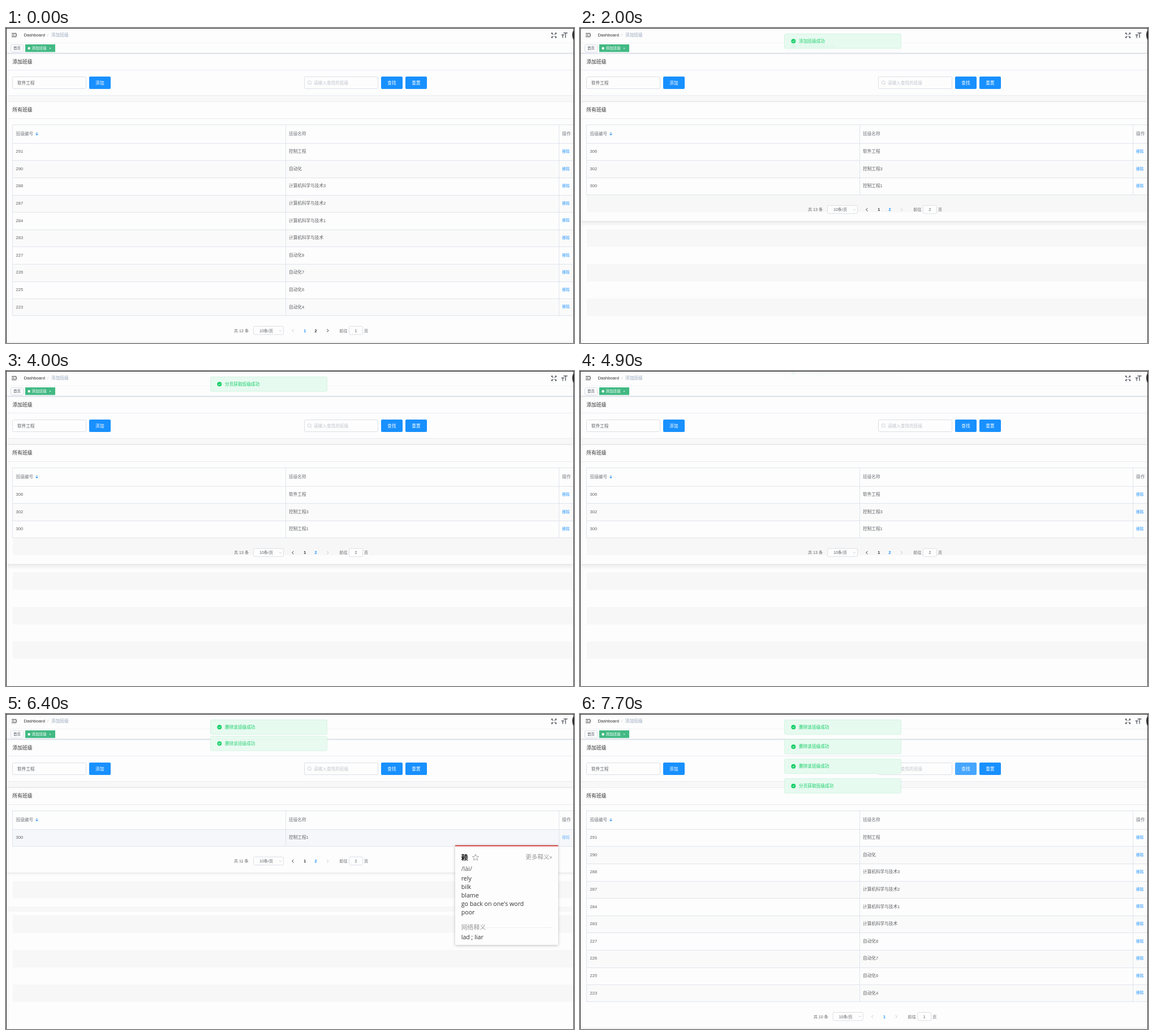
Recreate the animation shown at these times as an HTML page. Size 1004 by 558 pixels, loop 8 s.

```html
<!DOCTYPE html>
<html>
<head>
<meta charset="utf-8">
<title>班级管理</title>
<style>
  html, body { margin: 0; width: 100%; height: 100%; overflow: hidden; background: #fdfdfd; }
  svg { display: block; width: 1004px; height: 558px; }
  text { font-family: "Liberation Sans", "Noto Sans CJK SC", sans-serif; white-space: pre; }
  .dict text { font-family: "Open Sans", "Noto Sans CJK SC", sans-serif; }
</style>
</head>
<body>
<svg id="stage" viewBox="0 0 1004 558"></svg>
<script>
const LOOP = 8000, STEP = 100;
const BLUE = '#1890ff', LIGHT_BLUE = '#46a6ff', GREEN = '#13ce66';
const DARK = '#303133', BODY = '#606266', MUTED = '#c0c4cc', BORDER = '#dfe4ec';
const WHITE = '#fdfdfd', GAP = '#f8f8f9';
const ROW_TOP = 204, ROW_H = 30.6, SLOT_H = 34.7;

const FIRST_PAGE = [
  [291, '控制工程'], [290, '自动化'], [288, '计算机科学与技术3'], [287, '计算机科学与技术2'],
  [284, '计算机科学与技术1'], [283, '计算机科学与技术'], [227, '自动化8'], [226, '自动化7'],
  [225, '自动化6'], [223, '自动化4']
];
const SECOND_PAGE = [[306, '软件工程'], [302, '控制工程3'], [300, '控制工程1']];

const ADDED = '添加班级成功', PAGED = '分页获取班级成功', REMOVED = '删除该班级成功';
const FIRST_CLOSE = 3590;
const MESSAGES = [
  { text: ADDED, start: 880, end: FIRST_CLOSE, slot: () => 0 },
  { text: PAGED, start: 1980, end: 4700, slot: t => 1 - ease((t - FIRST_CLOSE) / 400) },
  { text: REMOVED, start: 5645, end: LOOP, slot: () => 0 },
  { text: REMOVED, start: 6210, end: LOOP, slot: () => 1 },
  { text: REMOVED, start: 6770, end: LOOP, slot: () => 2 },
  { text: PAGED, start: 6790, end: LOOP, slot: () => 3 }
];

// The CSS "ease" curve
function ease(x) {
  if (x <= 0) return 0;
  if (x >= 1) return 1;
  const curve = (u, a, b) => 3 * (1 - u) ** 2 * u * a + 3 * (1 - u) * u * u * b + u ** 3;
  let lo = 0, hi = 1;
  for (let i = 0; i < 20; i++) {
    const mid = (lo + hi) / 2;
    if (curve(mid, .25, .25) < x) lo = mid; else hi = mid;
  }
  return curve(lo, .1, 1);
}

const between = (t, from, to) => t >= from && t < to;

// y is the vertical middle of the text
function text(x, y, str, fill = BODY, size = 7.65, extra = '') {
  return `<text x="${x}" y="${y + size * .36}" fill="${fill}" font-size="${size}" ${extra}>${str}</text>`;
}
const centred = (x, y, str, fill, size, extra = '') =>
  text(x, y, str, fill, size, `text-anchor="middle" ${extra}`);
const rect = (x, y, w, h, fill, extra = '') =>
  `<rect x="${x}" y="${y}" width="${w}" height="${h}" fill="${fill}" ${extra}/>`;
const box = (x, y, w, h, stroke = '#dcdfe6', fill = WHITE) =>
  rect(x + .5, y + .5, w - 1, h - 1, fill, `stroke="${stroke}" rx="2"`);
const path = (d, stroke, width = 1, fill = 'none') =>
  `<path d="${d}" stroke="${stroke}" stroke-width="${width}" fill="${fill}"/>`;
const hline = (y, x = 1, fill = '#e8ecf3') => rect(x, y, 1003 - x, 1, fill);

function button(x, label, fill = BLUE) {
  return rect(x, 86, 38, 22, fill, 'rx="2"') +
    centred(x + 19, 97, label, '#fff', 7.65, 'font-weight="500"');
}

function header() {
  const corner = (sx, sy) =>
    `<g transform="translate(968.5 13) scale(${sx} ${sy})">` +
    path('M1.2 1.2L4 4', '#5a5e66', 1.3) + path('M4.7 1.6V4.7H1.6Z', 'none', 0, '#5a5e66') + '</g>';
  return path('M10 9.5H18.5M10 12.5H15M10 15.5H18.5', DARK, 1.1) +
    path('M18.8 10.8V14.2L16.2 12.5Z', 'none', 0, DARK) +
    text(31.5, 12.3, 'Dashboard', DARK) + text(73, 12.3, '/', MUTED) +
    text(80, 12.3, '添加班级', '#97a8be') +
    corner(1, 1) + corner(-1, 1) + corner(1, -1) + corner(-1, -1) +
    path('M985.5 8.7H992.5M989 8.7V17.5M981.8 12.3H986.6M984.2 12.3V17.5', '#5a5e66', 1.4) +
    path('M1003 4Q999 12 1003 21Z', 'none', 0, '#222') +
    hline(26, 1, '#f3f4f6') +
    box(8, 29, 23, 14, '#d8dce5') + text(13, 36, '首页', '#495060', 6.56) +
    rect(34, 29, 53, 13.5, '#42b983') + '<circle cx="40.7" cy="36" r="2.2" fill="#fff"/>' +
    text(45.5, 36, '添加班级', '#fff', 6.56, 'font-weight="500"') +
    path('M76.8 34.8L79.2 37.2M79.2 34.8L76.8 37.2', '#e6f7ef', .7) +
    rect(1, 44, 1002, 1.5, '#d3d8e2') + rect(1, 45.5, 1002, 1, '#eff1f5');
}

function toolbar(t) {
  const addFill = t === 600 ? '#2f9bff' : between(t, 700, 1100) ? LIGHT_BLUE : BLUE;
  return text(11.5, 60, '添加班级', DARK, 8.75) + hline(74) +
    box(11, 86, 131, 22) + text(20, 97, '软件工程') + button(147, '添加', addFill) +
    box(527, 86, 131, 22) +
    '<circle cx="536.3" cy="96.5" r="3" fill="none" stroke="#c0c4cc" stroke-width=".8"/>' +
    path('M538.4 98.6L540 100.2', MUTED, .8) +
    text(544, 97, '请输入查找的班级', MUTED) +
    button(663, '查找', t >= 7700 ? LIGHT_BLUE : BLUE) + button(706, '重置');
}

function tableView(t) {
  const rows = t < 2000 || t >= 6800 ? FIRST_PAGE
    : SECOND_PAGE.slice(t < 5700 ? 0 : t < 6200 ? 1 : 2);
  const hovered = between(t, 2100, 3600) ? 2 : between(t, 5600, 6800) ? 0 : -1;
  const bottom = ROW_TOP + rows.length * ROW_H;
  const cardEnd = bottom + 46;
  let out = rect(1, 119, 1002, 12, GAP) + hline(119) + hline(130);
  if (rows.length < 10) {
    out += rect(1, 341, 1002, 9, '#f7f7f7');
    out += rect(1, 131, 1002, cardEnd - 131, WHITE, 'filter="url(#cardShadow)"');
    for (let i = 3; i < 10; i += 2)
      out += rect(12, ROW_TOP + i * ROW_H, 991, ROW_H, '#f7f7f7');
  }
  out += hline(Math.round(cardEnd), 1, '#e6e8ec');
  out += text(11.5, 145.3, '所有班级', DARK, 8.75) + hline(160);
  out += hline(171, 11, BORDER) + text(17.5, 187, '班级编号', '#75787e') +
    text(500, 187, '班级名称', '#75787e') + text(983, 187, '操作', '#75787e') +
    path('M52 186.8H57L54.5 184.3Z', 'none', 0, '#a9c4e4') +
    path('M52 187.8H57L54.5 190.3Z', 'none', 0, BLUE);
  rows.forEach(([id, name], i) => {
    const top = ROW_TOP + i * ROW_H, mid = top + 14.4;
    const linkLit = i === 0 && between(t, 5200, 6800);
    out += rect(12, top, 991, ROW_H, i === hovered ? '#f5f7fa' : i % 2 ? '#fafafa' : WHITE) +
      hline(Math.round(top - .2), 11, BORDER) +
      text(17.5, mid, id) + text(500, mid, name) +
      text(983.3, mid + .2, '移除', linkLit ? '#65b3ff' : BLUE, 6.56);
  });
  out += hline(Math.round(bottom - .6), 11, BORDER);
  for (const x of [11, 494, 977]) out += rect(x, 171, 1, bottom - 171, BORDER);
  return out + pager(t, bottom + 26);
}

function pager(t, y) {
  const total = t < 900 ? 12 : t < 5700 ? 13 : t < 6200 ? 12 : t < 6800 ? 11 : 10;
  const page = between(t, 2000, 6800) ? 2 : 1;
  const single = total === 10;
  const left = single ? 9.7 : 0, right = single ? -9.7 : 0;
  const arrow = (x, dir, on) =>
    path(`M${x - dir * 1.3} ${y - 2.6}L${x + dir * 1.3} ${y}L${x - dir * 1.3} ${y + 2.6}`, on ? DARK : MUTED, 1);
  const number = (x, n, lit) =>
    centred(x, y, n, lit ? BLUE : DARK, 7.1, 'font-weight="700"');
  return text(403 + left, y, `共 ${total} 条`, BODY, 7.1) +
    box(437 + left, y - 8, 54, 15.5) + centred(460 + left, y, '10条/页', BODY, 7.1) +
    path(`M${483 + left} ${y - .8}l2 2l2 -2`, MUTED, .8) +
    arrow(507 + left, -1, page === 2) + number(528.3 + left, 1, page === 1) +
    (single ? '' : number(547.5, 2, page === 2 || between(t, 1700, 2000))) +
    arrow(568.7 + right, 1, page === 1 && !single) +
    text(589.3 + right, y, '前往', BODY, 7.1) + box(606 + right, y - 8, 25, 15.5) +
    centred(618.5 + right, y, page, BODY, 7.1) + text(633 + right, y, '页', BODY, 7.1);
}

function message(m, t) {
  const shown = (span) => ease((t - m.start) / span) - ease((t - m.end) / span);
  const alpha = shown(300);
  if (t < m.start || alpha <= 0) return '';
  const y = 10 + m.slot(t) * SLOT_H - 26 * (1 - shown(400));
  return `<g opacity="${alpha}" transform="translate(0 ${y})">` +
    box(361, 0, 207, 26.5, '#d2f4e1', '#e7faf0') +
    `<circle cx="377.3" cy="13.3" r="4" fill="${GREEN}"/>` +
    path('M375.4 13.4L376.8 14.8L379.3 12.1', '#fff', .9) +
    text(387, 13, m.text, GREEN) + '</g>';
}

function dictCard(x, y, w, h, word, wordSpan, body) {
  let star = '';
  for (let i = 0; i < 10; i++) {
    const r = i % 2 ? 2.7 : 6, a = i * Math.PI / 5;
    star += `${i ? 'L' : 'M'}${x + wordSpan + r * Math.sin(a)} ${y + 21.8 - r * Math.cos(a)}`;
  }
  return '<g class="dict">' + rect(x, y, w, h, WHITE, 'filter="url(#popShadow)"') +
    rect(x, y, w, 1.8, '#c9302c') +
    text(x + 10.5, y + 22.5, word, '#111', 12.1, 'font-weight="700"') +
    path(star + 'Z', '#999', .9) +
    text(x + w - 10.3, y + 21, '更多释义»', '#999', 10.5, 'text-anchor="end"') + body + '</g>';
}
const entry = (x, y, str, fill = '#333') => text(x, y, str, fill, 10.65);
const section = (x, y, str, end) =>
  text(x, y, str, '#999', 10.85) + rect(x + 45, y, end - x - 45, 1, '#eeeeee');

function popups(t) {
  if (between(t, 3300, 3600))
    return dictCard(537, 293, 228.5, 136.5, '控制工程', 72,
      entry(548, 333, '[自] control engineering') +
      section(548, 360, '网络释义', 755) +
      entry(548, 377, 'Control Engineering ; handling technology') +
      section(548, 399, '相关查询', 755) + entry(548, 413, '工程', '#3a78c3'));
  if (between(t, 6400, 6700)) {
    const senses = ['rely', 'bilk', 'blame', "go back on one's word", 'poor'];
    return dictCard(794, 232.5, 182, 176.5, '赖', 36,
      entry(804.7, 274.5, '/lài/', '#555') +
      senses.map((s, i) => entry(804.7, 291 + 15.1 * i, s)).join('') +
      section(804.7, 378, '网络释义', 966) + entry(804.7, 394.7, 'lad ; liar'));
  }
  return '';
}

const shadow = (id, dy, blur, alpha) =>
  `<filter id="${id}" x="-10%" y="-10%" width="120%" height="120%">` +
  `<feDropShadow dx="0" dy="${dy}" stdDeviation="${blur}" flood-opacity="${alpha}"/></filter>`;
const DEFS = `<defs>${shadow('cardShadow', 1, 2.5, .12)}${shadow('popShadow', 1, 2.5, .25)}</defs>`;
const EDGES = rect(0, 0, 1004, 1, '#222') + rect(0, 0, 1, 558, '#222') + rect(1003, 0, 1, 558, '#333');

function scene(t) {
  return DEFS + rect(0, 0, 1004, 558, WHITE) + tableView(t) + header() + toolbar(t) +
    MESSAGES.map(m => message(m, t)).join('') + popups(t) + EDGES;
}

const stage = document.getElementById('stage');
let last = -1;
function tick() {
  const t = Math.floor(performance.now() % LOOP / STEP) * STEP;
  if (t !== last) stage.innerHTML = scene(last = t);
  requestAnimationFrame(tick);
}
tick();
</script>
</body>
</html>
```
